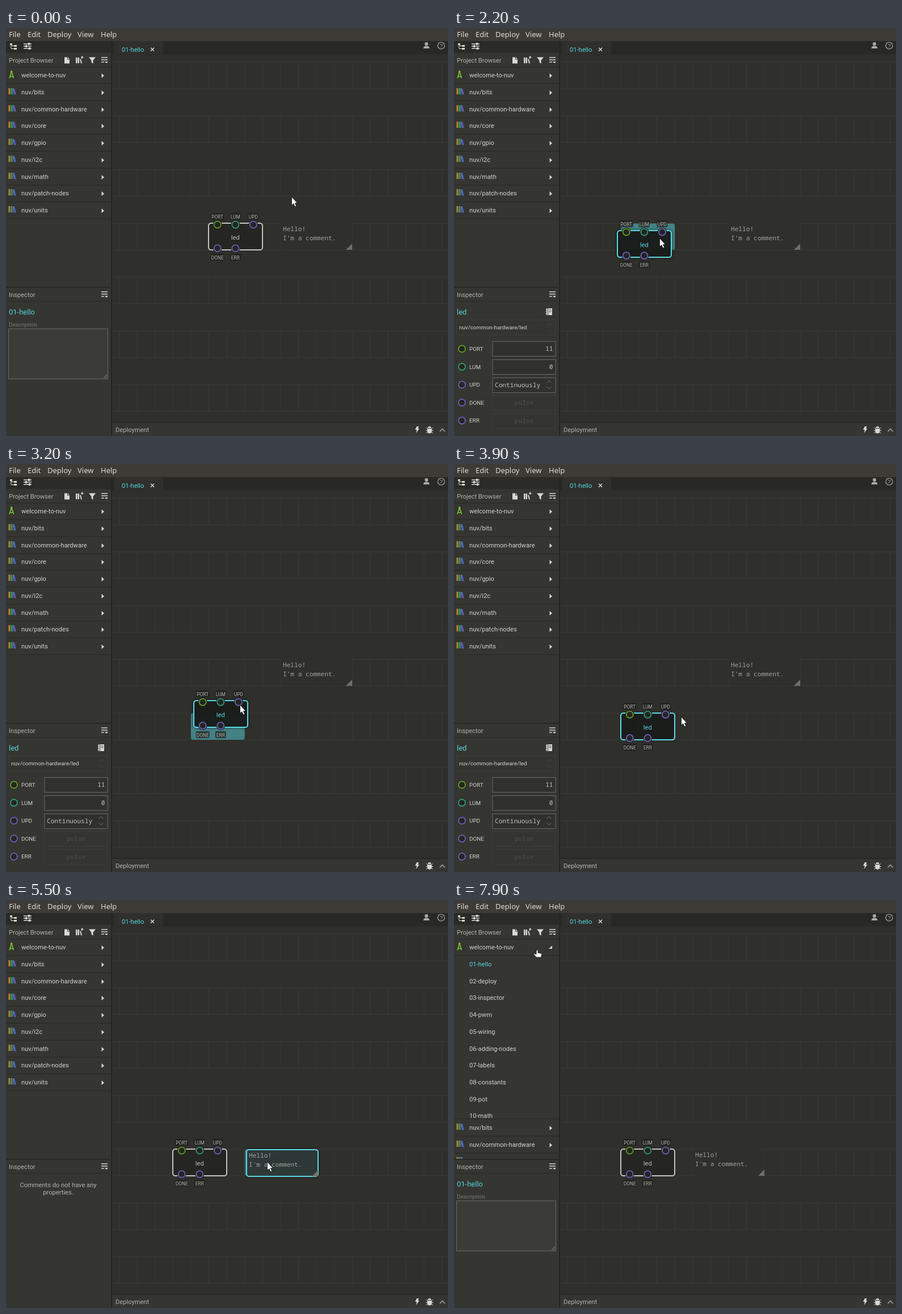
An HTML page that plays this animation: 779 px wide and 719 px high, repeating every 8000 ms.

```html
<!DOCTYPE html>
<html lang="en">
<head>
<meta charset="utf-8">
<title>Patch editor</title>
<style>
  html, body { margin: 0; width: 100%; height: 100%; overflow: hidden; background: #2f2f2b; }
  svg { display: block; }
  text { font: 11.14px Roboto, sans-serif; fill: #d2d2ce; white-space: pre; }
  .menu { font: 13px "Noto Sans", sans-serif; fill: #dfdbd2; }
  .head { fill: #b4b4af; }
  .title { font-size: 13px; fill: #56d3dc; }
  .cy { fill: #56d3dc; }
  .small { font-size: 9.85px; }
  .dim { fill: #7d7d79; }
  .pin { font-size: 8.36px; fill: #b0b0ab; text-anchor: middle; }
  .mono { font: 300 11.14px "Roboto Mono", "Noto Sans Mono", monospace; fill: #a3a39e; }
  .val { font-weight: 400; fill: #c4c4c0; }
  .mid { text-anchor: middle; }
  .end { text-anchor: end; }
  .off { fill: #50504c; }
  .field { fill: #30302c; stroke: #6a6a66; }
  .faint { fill: #343430; stroke: #3d3d39; }
  .ico { fill: #d8d8d4; }
  .soft { fill: #a9a9a4; }
  .ln { fill: none; stroke: #d8d8d4; stroke-width: 1.5; }
  .body { fill: #252522; stroke: #c4c4bf; stroke-width: 2; }
  .name { fill: #bcbcb7; text-anchor: middle; }
  .hot .body { stroke: #5adbe4; }
  .sel .body { fill: #1b1d1b; fill-opacity: .95; }
  .sel .name { fill: #56d3dc; }
  .drag .body, .drag .frame { filter: drop-shadow(0 0 2px #0009); }
  .frame { fill: #2f2f2b; stroke: none; stroke-width: 2; }
  .hot .frame { stroke: #5adbe4; }
  .drag .frame { fill: #2e3837; }
</style>
</head>
<body>
<svg id="stage" width="779" height="719" viewBox="0 0 779 719"></svg>
<script>
const STEP = 31.6, ROW = 94.75, GX = 199.5, GY = 60.2, LINE = 29.72;
const GREEN = '#5f9f1f', TEAL = '#2f9a76', VIOLET = '#6a60bd';

const rect = (x, y, w, h, fill, more = '') =>
  `<rect x="${x}" y="${y}" width="${w}" height="${h}" fill="${fill}" ${more}/>`;
const text = (x, y, s, cls = '') => `<text x="${x}" y="${Math.round(y)}" class="${cls}">${s}</text>`;
const path = (d, cls = 'ico', more = '') => `<path d="${d}" class="${cls}" ${more}/>`;
const group = (id, s) => `<g id="${id}">${s}</g>`;
const at = (x, y, s) => `<g transform="translate(${x} ${y})">${s}</g>`;

// Canvas grid
function grid() {
  let d = '';
  for (let r = 0; r < 7; r++) {
    const y = GY + r * ROW;
    d += `M187 ${y}H779M187 ${y + 46.7}H779`;
    for (let k = 0; k < 19; k++) d += `M${GX + k * STEP} ${y}v46.7`;
  }
  return path(d, '', 'fill="none" stroke="#3a3a36"');
}

// Sidebar rows
const books = at(4, 0,
  rect(0.5, -7, 2.7, 11, '#b58c30') + rect(4, -7, 2.7, 11, '#3c9158') + rect(7.2, -7, 1.8, 11, '#38799a') +
  rect(9.5, -6.5, 2.7, 11, '#6a60bd', 'transform="rotate(-14 11 -1)"'));
const arrow = path('M168.5 -3l4.5 4l-4.5 4z');
const rule = y => rect(0, y, 185, 1.2, '#292926');
const rowY = i => Math.round(113 + i * LINE);

const libs = ['bits', 'common-hardware', 'core', 'gpio', 'i2c', 'math', 'patch-nodes', 'units'];
const library = libs.map((s, i) =>
  at(0, rowY(i), books + text(27, 4, 'nuv/' + s) + arrow + rule(14.5))).join('');

const patches = ['hello', 'deploy', 'inspector', 'pwm', 'wiring', 'adding-nodes', 'labels', 'constants', 'pot', 'math'];
const patchList = patches.map((s, i) =>
  text(27, rowY(i) + 4, String(i + 1).padStart(2, '0') + '-' + s, i ? '' : 'cy')).join('');

const burger = y => path(`M168 ${y - 4}h11M168 ${y}h11M168 ${y + 4}h5`, 'ln') + path(`M174 ${y + 3}h6l-3 3z`);

function sidebar() {
  return rect(0, 23, 186, 696, '#353531') +
    rect(0, 23, 186, 21, '#2a2a27') +
    path('M7 27h4v3h-4zM14 30h5v3h-5zM14 35h5v3h-5z') + path('M9 30v6.5h5M9 31.5h5', 'ln', 'style="stroke-width:1"') +
    path('M31 28h14M31 32h14M31 36h14', 'ln') + path('M39 26h3v4h-3zM34 30h3v4h-3zM40 34h3v4h-3z') +
    text(5, 61, 'Project Browser', 'head') +
    path('M103 51.5h5v4h4v7h-9zM109 51.5l3 3h-3z') +
    path('M123 52h2.5v10h-2.5zM126.5 52h2.5v10h-2.5zM130 55l2-.5l2 7.5l-2 .5zM132 51h1.5v-1.5h1.5v1.5h1.5v1.5h-1.5v1.5h-1.5v-1.5h-1.5z') +
    path('M146 51.5h12l-4.5 5.5v6l-3-2.5v-3.5z') + burger(56) + rule(68) +
    path('M6 88.5L9.7 77L13.5 88.5M6.5 84.5Q10 87 13 84.5', 'ln', 'style="stroke:#7fd32c"') +
    `<circle cx="9.7" cy="77" r="1.8" fill="#7fd32c"/>` +
    text(27, 87, 'welcome-to-nuv') + rule(97.5) +
    group('closedArrow', at(0, 83, arrow)) +
    group('openArrow', path('M173 80.5v5.5h-6z')) +
    `<g clip-path="url(#tree)">` + group('libs', library) +
    group('patches', `<g clip-path="url(#list)">${patchList}</g>` + rule(385)) + `</g>` +
    rect(0, 456, 186, 1.5, '#252522') +
    text(5, 474, 'Inspector', 'head') + burger(469) + rule(481);
}

// Inspector views
const ring = (x, y, c) =>
  `<circle cx="${x}" cy="${y}" r="6" fill="#252522" stroke="${c}" stroke-width="1.8"/>`;
const chevrons = (y, c) => path(`M163.5 ${y - 3.5}l4-4l4 4M163.5 ${y + 3.5}l4 4l4-4`, '', `fill="none" stroke="${c}"`);

const patchView = text(5, 505, '01-hello', 'title') + text(5, 526, 'Description', 'small dim') +
  rect(4.5, 530, 175, 88.5, '#3b3b37', 'stroke="#6a6a66"') +
  path('M172 617l6-6M175.5 617l2.5-2.5', '', 'stroke="#999"');

const commentView = text(92, 506, 'Comments do not have any', 'mid head') + text(92, 519, 'properties.', 'mid head');

const props = [['PORT', GREEN, '11'], ['LUM', TEAL, '0'], ['UPD', VIOLET, 'Continuously'], ['DONE', VIOLET], ['ERR', VIOLET]];
const nodeView = text(5, 505, 'led', 'title') +
  path('M163 494h10v12h-10z') + path('M165.5 494v12M167.5 497h4M167.5 500h4', '', 'stroke="#353531"') +
  path('M161.5 496.5h3M161.5 500h3M161.5 503.5h3', 'ln', 'style="stroke-width:1"') +
  rect(4.5, 514.5, 175, 26.5, '', 'class="faint"') + text(9, 531, 'nuv/common-hardware/led', 'small') + chevrons(527.5, '#454541') +
  props.map(([s, c, v], i) => {
    const y = 565.4 + i * STEP;
    return ring(14, y, c) + text(27, y + 3.6, s, 'small') +
      rect(68, Math.round(y) - 12.5, 111, 26, '', `class="${v ? 'field' : 'faint'}"`) +
      (!v ? text(123.5, y + 4, 'pulse', 'mono mid off')
        : i == 2 ? text(72, y + 4, v, 'mono val') + chevrons(y, '#777') : text(174.5, y + 4, v, 'mono val end'));
  }).join('');

// Patch board
const node = rect(-0.5, -0.5, 95, 47, '', 'rx="4.5" class="body"') + text(46.8, 28, 'led', 'name') +
  [['PORT', 0, 0, GREEN], ['LUM', 1, 0, TEAL], ['UPD', 2, 0, VIOLET], ['DONE', 0, 1, VIOLET], ['ERR', 1, 1, VIOLET]]
    .map(([s, col, low, c]) => {
      const x = 15.2 + col * STEP, y = low ? 43.6 : 2.2, ly = low ? 59.5 : -12.5, w = s.length * 5 + 4;
      return `<circle cx="${x}" cy="${y}" r="8" fill="#222220"/>` + ring(x, y, c) +
        rect(x - w / 2, ly - 6, w, 12, '#222220', 'rx="2" opacity=".8"') + text(x, ly + 3, s, 'pin');
    }).join('');

const comment = rect(0, -0.5, 126, 47, '', 'rx="4" class="frame"') +
  text(4, 13, 'Hello!', 'mono') + text(4, 29, "I'm a comment.", 'mono') +
  path('M126 35.5v11h-11z', '', 'fill="#70706b"');

const chrome = rect(0, 0, 779, 23, '#3c3b36') +
  [['File', 5], ['Edit', 38], ['Deploy', 73], ['View', 126], ['Help', 167]].map(([s, x]) => text(x, 16, s, 'menu')).join('') +
  rect(187, 23, 592, 23.5, '#282825') + rect(190.5, 23, 86.5, 23.5, '#2f2f2b') +
  text(204, 42, '01-hello', 'cy') + path('M255 34.7l6 6M261 34.7l-6 6', 'ln') +
  `<circle cx="741" cy="28" r="3" class="soft"/>` + path('M735.5 36q0-4.5 5.5-4.5t5.5 4.5z', 'soft') +
  `<circle cx="767" cy="31" r="6" class="ln" style="stroke:#a9a9a4;stroke-width:1.2"/>` + text(767, 35, '?', 'mid small soft') +
  rect(187, 695, 592, 24, '#353531') + rect(187, 694.5, 592, 1.5, '#252522') + text(193, 712, 'Deployment', 'head') +
  path('M724 702h3.5l-1.5 4h2.5l-6 8l1.5-6h-3z') +
  path('M742.5 706h8v5q-1 3.5-4 3.5t-4-3.5zM743.5 705q0-3 3-3t3 3z') +
  path('M740.5 704l3 2.5M752.5 704l-3 2.5M740 709.5h13M740.5 714l3-2M752.5 714l-3-2', 'ln', 'style="stroke-width:1"') +
  path('M764.5 711l4.5-4.5l4.5 4.5', 'ln', 'style="stroke:#8a8a85;stroke-width:2"') +
  rect(185, 23, 2, 696, '#252522');

document.getElementById('stage').innerHTML =
  `<defs><clipPath id="tree">${rect(0, 98, 186, 358, '#000')}</clipPath><clipPath id="list">${rect(0, 98, 186, 287, '#000')}</clipPath></defs>` +
  rect(0, 0, 779, 719, '#2f2f2b') + grid() +
  group('slot', rect(0, 0, 94.8, 46.7, '#438184', 'rx="4" id="slotBox"')) +
  group('comment', comment) + group('node', node) + sidebar() +
  group('patchView', patchView) + group('nodeView', nodeView) + group('commentView', commentView) + chrome +
  group('cursor', path('M.5 .5V15.5L3.8 12.5L6.2 17.8L8.7 16.7L6.4 11.5H10.5Z', '', 'id="arrowTip" fill="#fff" stroke="#111" stroke-width=".8"') +
    path('M-1 0h2q1 0 1 1v4l5.5 1q1 0 1 2l-1 5h-8l-5-5q0-2 2-1.2l2.5 1.2v-6q0-1 1-1z', '', 'id="hand" fill="#fff" stroke="#111" stroke-width=".8"'));

// Motion: [ms, x, y] waypoints joined by a monotone cubic
const cursorPath = [[200, 503, 297], [900, 434.5, 357.5], [1100, 434.5, 357.5], [1200, 408, 388], [1700, 371, 452], [1900, 371, 452],
  [2200, 362, 370], [2700, 380, 230], [2800, 381, 257], [3200, 412, 424], [3300, 416, 442], [3600, 378, 460], [3700, 378, 460],
  [4500, 520.5, 365], [4800, 520.5, 365], [5500, 460, 460.5], [5900, 460, 460.5], [6300, 452, 356], [6500, 452, 356],
  [6900, 351, 234], [7100, 351, 234], [7600, 145.5, 87.5]];
const nodePath = [[1100, 357.5, 344.5], [1200, 330.5, 374.5], [1700, 295, 439], [1900, 295, 439], [2200, 288.5, 357.5],
  [2700, 303, 218], [2800, 304, 246], [3200, 331.5, 417.5], [3300, 337, 438], [3600, 301, 447]];

function follow(keys, t) {
  const last = keys.length - 1;
  if (t <= keys[0][0]) return keys[0].slice(1);
  if (t >= keys[last][0]) return keys[last].slice(1);
  const i = keys.findIndex(k => k[0] > t) - 1;
  const [a, b] = [keys[i], keys[i + 1]], h = b[0] - a[0], u = (t - a[0]) / h;
  return [1, 2].map(d => {
    const slope = j => (keys[j + 1][d] - keys[j][d]) / (keys[j + 1][0] - keys[j][0]);
    const tangent = j => {
      if (j == 0 || j == last) return 0;
      const p = slope(j - 1), q = slope(j);
      return p * q > 0 ? 2 * p * q / (p + q) : 0;
    };
    const v = 1 - u;
    return a[d] * (1 + 2 * u) * v * v + b[d] * (3 - 2 * u) * u * u + h * u * v * (tangent(i) * v - tangent(i + 1) * u);
  });
}

const el = id => document.getElementById(id);
const half = v => Math.round(v - 0.5) + 0.5;
const move = (id, [x, y]) => el(id).setAttribute('transform', `translate(${x} ${y})`);
const show = (id, on) => { el(id).style.display = on ? '' : 'none'; };
const snap = ([x, y]) => [GX + Math.round((x - GX) / STEP) * STEP, GY + Math.round((y - GY) / ROW) * ROW];
const within = ([px, py], [x, y], w) => px >= x && px <= x + w && py >= y && py <= y + 46.7;
const flags = (id, o) => el(id).setAttribute('class', Object.keys(o).filter(k => o[k]).join(' '));

function draw(t) {
  const cur = follow(cursorPath, t);
  const nodeSel = t >= 1100 && t < 4800, nodeDrag = t >= 1100 && t < 3800;
  const comSel = t >= 4800 && t < 6600, comDrag = t > 4800 && t < 5700;

  let n = follow(nodePath, t);
  if (!nodeDrag) n = snap(n);
  let c = [484, 344.5];
  if (t > 4800) c = [cur[0] - 36.5, cur[1] - 20];
  if (t >= 5700) c = snap([423.5, 440]);

  // Boards sit on half pixels so that their borders stay sharp
  move('node', n.map(half));
  flags('node', { sel: nodeSel, hot: nodeSel || within(cur, n, 94.8), drag: nodeDrag });
  move('comment', [Math.round(c[0]), half(c[1])]);
  flags('comment', { hot: comSel || within(cur, c, 126.4), drag: comDrag });

  show('slot', nodeDrag || comDrag);
  move('slot', snap(nodeDrag ? n : c));
  el('slotBox').setAttribute('width', nodeDrag ? 94.8 : 126.4);

  show('nodeView', nodeSel);
  show('commentView', comSel);
  show('patchView', !nodeSel && !comSel);

  const open = t >= 7900;
  show('openArrow', open);
  show('closedArrow', !open);
  show('patches', open);
  move('libs', [0, open ? 288 : 0]);

  const hand = cur[0] < 186;
  move('cursor', cur.map(Math.round));
  show('hand', hand);
  show('arrowTip', !hand);
}

const start = performance.now();
function tick() {
  const t = (performance.now() - start) % 8000;
  draw(Math.floor(t / 100) * 100);
  requestAnimationFrame(tick);
}
tick();
</script>
</body>
</html>
```
